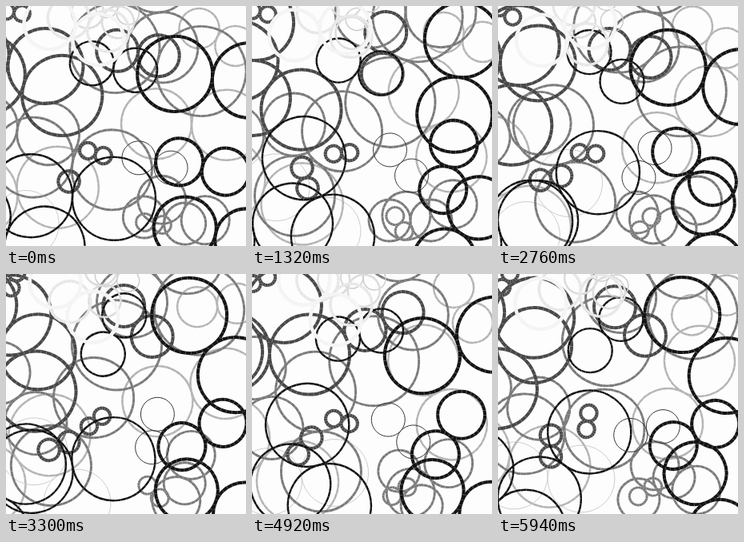
These frames come from a looping animation (300x300 px, 6 s). An HTML page with a canvas:

```html
<!DOCTYPE html>
<html>
<head>
<meta charset="utf-8">
<style>
html, body { margin: 0; width: 100%; height: 100%; overflow: hidden; background: #fdfdfd; }
canvas { display: block; }
</style>
</head>
<body>
<canvas id="stage" width="300" height="300"></canvas>
<script>
const ctx = document.getElementById('stage').getContext('2d');
const STEP = 60, STEPS = 100;

const pairs = [];

// Touching twin rings: centre x, y, radius, start angle, degrees per step
function group(grey, width, ...places) {
  for (const [x, y, r, start, speed] of places) {
    pairs.push({ x, y, r, start, speed, grey, width });
  }
}

group(205, 1, [62, 254, 42, -26, 11.2]);
group(180, 2.5,
  [14, 232, 51, -6, 9.25],
  [264, 39, 25, 26, 15.8],
  [232, 148, 44, 1, 2.99]);
group(122, 2.9,
  [222, 255, 30, 25, 14.6],
  [192, 8, 44, 85, 4.3],
  [14, 155, 39, 7, 7.4],
  [83, 197, 50, 9, 5.33],
  [190, 67, 56, 15, 12.4],
  [198, 268, 26, 9, 15.95],
  [184.5, 272, 11, 8, 10.5]);
group(72, 4,
  [22, 99, 50, 15, 17.4],
  [3, 68, 47, 8.5, 3.82],
  [165, 59, 26, 7, 4],
  [112, 184, 10.2, 17.5, 15.36],
  [66, 215, 13.3, 19, 18.9],
  [10, 8, 10, 8, 8.4]);
group(55, 1, [186, 196, 21, 17, 17.86]);
group(16, 2.4,
  [83, 239, 52, 2, 3.08],
  [2, 282, 50, 22, 14.82],
  [134.5, 76, 27.5, 9, 8.54]);
group(20, 4,
  [258, 89, 47, 5, 4.13],
  [262, 285, 39, 11, 13.29],
  [245.5, 201, 29.5, 12, 12.33]);

// pale rings shrinking towards the top edge
for (let i = 3; i >= 0; i--) {
  group(244 - 13 * i, 4.5 - i, [85 + 18 * i, 32 - 9 * i, 32 - 6 * i, 18, 7 + 2 * i]);
}

function ring(x, y, r, spin, grey, width) {
  ctx.beginPath();
  ctx.arc(x, y, r, spin, spin + 2 * Math.PI);
  ctx.setLineDash([]);
  ctx.lineWidth = width;
  ctx.strokeStyle = `rgb(${grey},${grey},${grey})`;
  ctx.stroke();
  if (width < 2) return;
  // fine pale seams across the line
  const seams = Math.round(r * 0.6 + 14);
  const pitch = 2 * Math.PI * r / seams;
  ctx.setLineDash([0.6, pitch - 0.6]);
  ctx.strokeStyle = 'rgba(255,255,255,.4)';
  ctx.stroke();
}

function draw(step) {
  ctx.fillStyle = '#fdfdfd';
  ctx.fillRect(0, 0, 300, 300);
  for (const { x, y, r, start, speed, grey, width } of pairs) {
    const a = (start + speed * step) * Math.PI / 180;
    const dx = r * Math.cos(a), dy = r * Math.sin(a);
    ring(x + dx, y + dy, r, a, grey, width);
    ring(x - dx, y - dy, r, a + Math.PI, grey, width);
  }
}

const begin = performance.now();
function tick() {
  const elapsed = Math.max(0, performance.now() - begin);
  draw(Math.floor(elapsed / STEP) % STEPS);
  requestAnimationFrame(tick);
}
tick();
</script>
</body>
</html>
```
